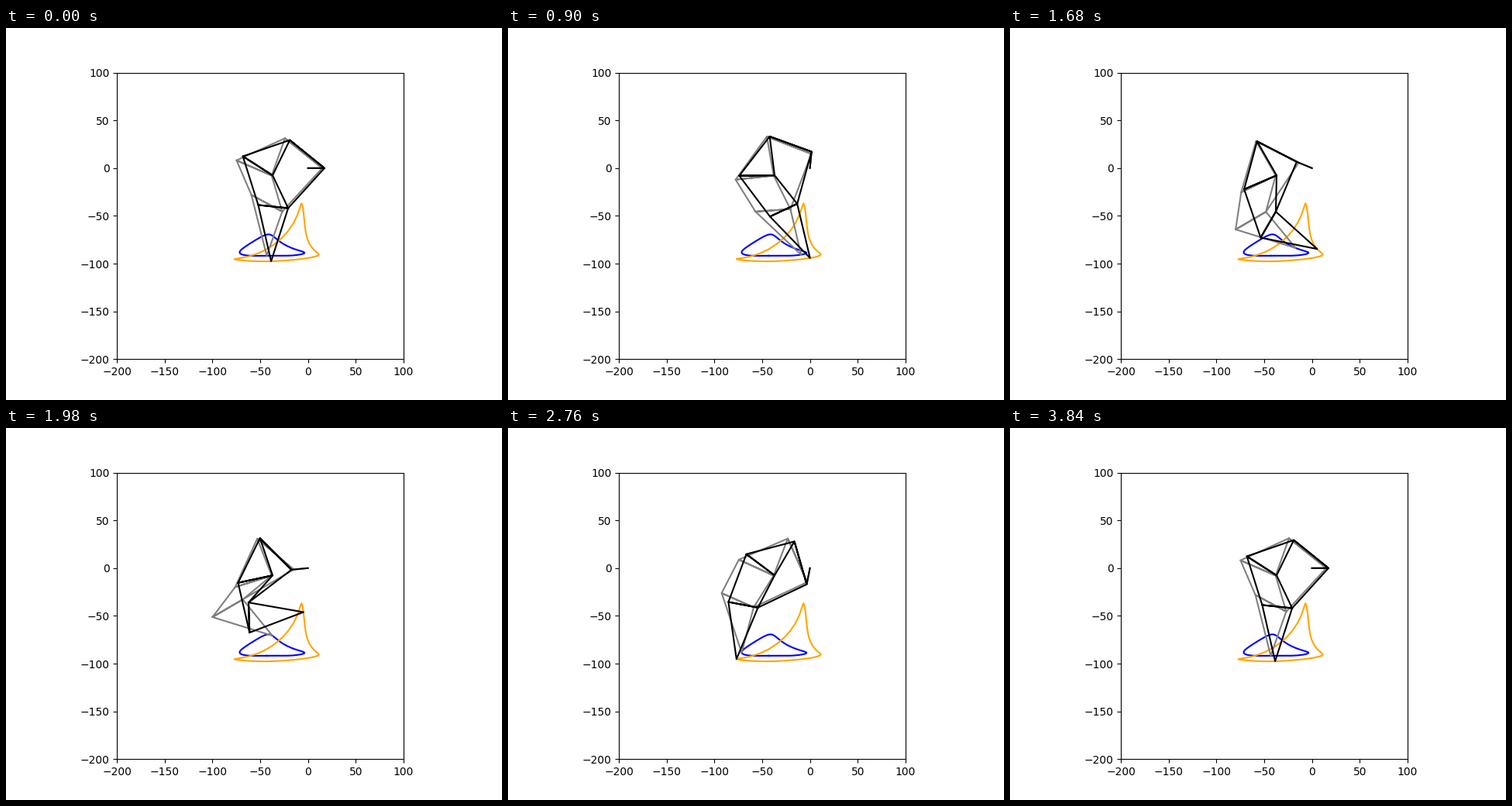
A matplotlib script for the animation above (3870 ms loop, 640x480 px).

```python
import numpy as np
import matplotlib.pyplot as plt
from matplotlib.animation import FuncAnimation

FRAMES = 129
INTERVAL = 30

# Walking-leg bar lengths: crank r, fixed pivot, and links b..k
CLASSIC = dict(r=15, pivot=(-38, -7.8), b=41.5, c=39.3, d=40.1, e=55.8,
               f=39.4, g=36.7, h=65.7, i=49, j=50, k=61.9)
TUNED = dict(r=17.3, pivot=(-37, -7.6), b=41.1, c=38, d=37, e=52,
             f=53.5, g=31.5, h=60.4, i=58.4, j=46.7, k=56.6)


def joint(p, q, rp, rq):
    """Point at distance rp from p and rq from q, left of the way p to q."""
    gap = q - p
    dist = np.hypot(*gap)
    u = gap / dist
    along = (rp**2 - rq**2 + dist**2) / (2 * dist)
    side = np.sqrt(max(rp**2 - along**2, 0))
    return p + along * u + side * np.array([-u[1], u[0]])


def solve(leg, theta):
    """Return the bars as one polyline, and the foot position."""
    origin = np.zeros(2)
    pivot = np.array(leg["pivot"])
    crank = leg["r"] * np.array([np.cos(theta), np.sin(theta)])
    top = joint(pivot, crank, leg["b"], leg["j"])
    back = joint(pivot, top, leg["d"], leg["e"])
    knee = joint(crank, pivot, leg["k"], leg["c"])
    heel = joint(knee, back, leg["g"], leg["f"])
    foot = joint(knee, heel, leg["i"], leg["h"])
    bars = np.array([origin, crank, top, back, pivot, top, crank, knee,
                     pivot, back, heel, knee, heel, foot, knee])
    return bars, foot


angles = np.linspace(0, 2 * np.pi, FRAMES)

fig, ax = plt.subplots(figsize=(6.4, 4.8), dpi=100)
ax.set_aspect("equal")
ax.set_xlim(-200, 100)
ax.set_ylim(-200, 100)

for leg, color in ((CLASSIC, "blue"), (TUNED, "orange")):
    trace = np.array([solve(leg, a)[1] for a in angles])
    ax.plot(trace[:, 0], trace[:, 1], color=color)

legs = [(leg, ax.plot([], [], color=color)[0])
        for leg, color in ((CLASSIC, "gray"), (TUNED, "black"))]


def update(n):
    for leg, line in legs:
        line.set_data(*solve(leg, angles[n])[0].T)
    return [line for _, line in legs]


anim = FuncAnimation(fig, update, frames=FRAMES, interval=INTERVAL,
                     repeat=True, repeat_delay=0)
plt.show()
```
